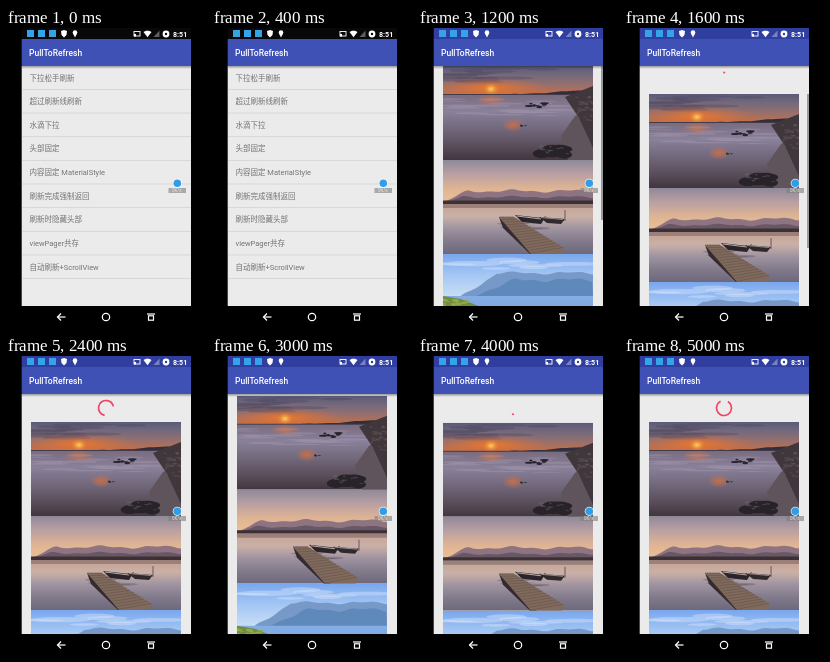
These frames come from a looping animation (200x300 px, 5200 ms). An HTML page with a canvas:

```html
<!DOCTYPE html>
<html lang="zh">
<head>
<meta charset="utf-8">
<title>PullToRefresh</title>
<style>
html, body { margin: 0; width: 100%; height: 100%; overflow: hidden; background: #000; }
canvas { display: block; width: 200px; height: 300px; }
</style>
</head>
<body>
<canvas id="stage"></canvas>
<script>
const LOOP = 5200, STEP = 200;
const LEFT = 15.7, WIDTH = 169.3, TOP = 38, BOTTOM = 278;
const PHOTO_W = 150, PHOTO_H = 94, HEADER = 28;
const OPEN = 600, SECOND_PULL = 3130, RELEASE = 3650;
const SPIN = 1333, SWEEP = 288, TURN = 234 / SPIN;

const canvas = document.getElementById('stage');
const c = canvas.getContext('2d');
const dpr = window.devicePixelRatio || 1;
canvas.width = 200 * dpr;
canvas.height = 300 * dpr;

const rows = ['下拉松手刷新', '超过刷新线刷新', '水滴下拉', '头部固定',
  '内容固定 MaterialStyle', '刷新完成强制返回', '刷新时隐藏头部',
  'viewPager共存', '自动刷新+ScrollView'];

const part = (t, from, to) => Math.min(1, Math.max(0, (t - from) / (to - from)));
const ease = x => 1 - (1 - part(x, 0, 1) ** 2) ** 4.5;
const easeOut = x => 1 - (1 - x) ** 2;

function pullAt(t) {
  return HEADER * easeOut(part(t, 1200, 1600))
    - HEADER * easeOut(part(t, 2700, 3100))
    + 44 * part(t, SECOND_PULL, RELEASE) ** 2
    - 16 * easeOut(part(t, RELEASE, 4100));
}

function seeded(seed) {
  return () => (seed = seed * 16807 % 2147483647) / 2147483647;
}

function rect(color, x, y, w, h) {
  c.fillStyle = color;
  c.fillRect(x, y, w, h);
}

function fade(y, h, ...colors) {
  const g = c.createLinearGradient(0, y, 0, y + h);
  colors.forEach((col, i) => g.addColorStop(i / (colors.length - 1), col));
  return g;
}

function band(y, h, ...colors) {
  rect(fade(y, h, ...colors), 0, y, PHOTO_W, h);
}

function poly(color, ...p) {
  c.fillStyle = color;
  c.beginPath();
  for (let i = 0; i < p.length; i += 2) c.lineTo(p[i], p[i + 1]);
  c.fill();
}

function oval(color, x, y, rx, ry = rx) {
  c.fillStyle = color;
  c.beginPath();
  c.ellipse(x, y, rx, ry, 0, 0, 7);
  c.fill();
}

function line(color, width, ...p) {
  c.strokeStyle = color;
  c.lineWidth = width;
  c.beginPath();
  for (let i = 0; i < p.length; i += 2) c.lineTo(p[i], p[i + 1]);
  c.stroke();
}

function text(str, x, y, font, color) {
  c.font = font + ' Roboto, "Noto Sans CJK SC", "Noto Sans CJK", sans-serif';
  c.fillStyle = color;
  c.fillText(str, x, y);
}

function glow(x, y, rx, ry, color) {
  c.save();
  c.translate(x, y);
  c.scale(rx, ry);
  const g = c.createRadialGradient(0, 0, 0, 0, 0, 1);
  g.addColorStop(0, color);
  g.addColorStop(1, 'rgba(230,110,50,0)');
  oval(g, 0, 0, 1);
  c.restore();
}

// soft streaks or stones scattered inside a box
function scatter(color, count, seed, x, y, w, h, rx, ry) {
  const rnd = seeded(seed);
  for (let i = 0; i < count; i++) {
    oval(color, x + rnd() * w, y + rnd() * h, rx * (0.5 + rnd()), ry * (0.5 + rnd()));
  }
}

// skyline rising from the left edge to full height over the given slope
function ridge(color, left, base, height, slope, rough) {
  const p = [left, base];
  for (let x = left; x <= PHOTO_W; x += 2) {
    const bump = Math.sin(x / 9) + 0.6 * Math.sin(x / 3.7 + 2);
    p.push(x, base - height * part(x, left, left + slope) - rough * bump);
  }
  poly(color, ...p, PHOTO_W, base);
}

function beach() {
  band(0, 29, '#5b5b78', '#766a7c', '#98706c', '#c66f45');
  scatter('rgba(66,62,86,.3)', 12, 5, 0, 2, 150, 15, 22, 1.5);
  glow(48, 22, 60, 10, 'rgba(245,120,35,.85)');
  glow(48, 23, 9, 7, '#ffd75c');
  ridge('#332e3c', 60, 29, 4, 70, 0.4);
  rect('#433b49', 0, 28, 150, 1.2);
  band(29, 65, '#796c80', '#89809a', '#746a7e', '#5d515e', '#41363f');
  scatter('rgba(178,165,184,.3)', 18, 9, 0, 32, 130, 18, 18, 0.8);
  glow(48, 34, 16, 6, 'rgba(225,125,75,.6)');
  glow(70, 59, 11, 7, 'rgba(222,110,55,.75)');
  scatter('#29252f', 9, 21, 86, 37, 20, 4, 3, 0.9);
  scatter('#342d35', 3, 4, 78, 59, 6, 1, 2, 0.7);
  poly('#5f535c', 150, 44, 132, 50, 118, 70, 125, 94, 150, 94);
  poly('#40373d', 122, 31, 150, 20, 150, 82, 136, 52);
  scatter('rgba(102,87,90,.5)', 25, 31, 134, 29, 16, 28, 2, 1);
  scatter('#282329', 9, 13, 99, 82, 24, 8, 7, 3);
  scatter('rgba(105,95,102,.55)', 12, 8, 97, 80, 28, 9, 2, 0.8);
}

function pier() {
  band(0, 43, '#8f8999', '#baa0a3', '#dfb493', '#edc093');
  ridge('#8d7480', 0, 43, 12, 25, 1.1);
  ridge('#685766', 0, 43, 6, 20, 0.8);
  rect('#3c3035', 0, 40.5, 150, 3.5);
  band(44, 50, '#c6a493', '#c9b0a7', '#9e929f', '#817a8b', '#6d687b');
  rect('rgba(90,70,78,.4)', 0, 44, 150, 4);
  scatter('rgba(70,62,76,.3)', 8, 17, 70, 62, 45, 7, 12, 1);
  poly('#2a242b', 72, 55, 99, 58, 103, 56, 98, 64, 79, 62);
  line('#c8bab3', 0.9, 74, 56, 98, 59);
  poly('#30292e', 96, 57, 122, 59, 118, 64, 104, 63);
  line('#aba09d', 0.8, 98, 57.5, 120, 59.5);
  line('#514349', 0.8, 122, 50, 122, 61);
  poly('#342b30', 56, 57, 60, 68, 87, 94, 94, 94);
  poly('#806a5d', 56, 57, 71, 57, 121, 88, 119, 94, 88, 94);
  for (let k = 0; k <= 1; k += 0.07) {
    line('#655249', 0.6, 56 + 32 * k, 57 + 37 * k, 71 + 50 * k, 57 + 31 * k);
  }
}

function lake() {
  band(0, 43, '#79a7ee', '#a5c7f4', '#c9dff5');
  scatter('rgba(220,232,250,.4)', 8, 11, 10, 5, 140, 12, 28, 2);
  ridge('#7799c8', 18, 43, 24, 36, 1);
  ridge('#5f88bb', 25, 43, 17, 48, 1.4);
  band(42, 52, '#86aee6', '#6293d2');
  poly('#718f3a', 0, 42, 18, 45, 38, 53, 80, 94, 0, 94);
  scatter('#91aa4b', 14, 6, 0, 45, 24, 8, 3, 0.8);
}

function list() {
  rows.forEach((label, i) => {
    const y = TOP + i * 23.65;
    text(label, 23.5, y + 14.5, '7.5px', '#727272');
    rect('#d2d2d2', LEFT, y + 23, WIDTH, 0.8);
  });
}

// the head sweeps ahead in the first half of a turn, the tail follows in the second
function spinner(t, pull) {
  const dragged = t >= SECOND_PULL;
  const dt = t - (dragged ? 4333 : 1590);
  const turns = Math.max(0, dt / SPIN);
  const p = turns % 1;
  const base = (dragged ? 191 : 270) + TURN * dt + SWEEP * Math.floor(turns);
  const held = dragged ? 240 * (1 - ease((t - RELEASE + 50) / 450)) : 0;
  const head = base + SWEEP * ease(2 * p) + 7;
  const tail = base + SWEEP * ease(2 * p - 1) - held - 7;
  c.strokeStyle = '#ee4468';
  c.lineWidth = 1.7;
  c.beginPath();
  c.arc(100, TOP + pull - HEADER / 2, 7.5, tail * Math.PI / 180, head * Math.PI / 180);
  c.stroke();
}

function page(t, pull) {
  if (pull > 0) spinner(t, pull);
  [beach, pier, lake].forEach((photo, i) => {
    c.save();
    c.translate(25, TOP + pull + i * PHOTO_H);
    c.beginPath();
    c.rect(0, 0, PHOTO_W, PHOTO_H);
    c.clip();
    photo();
    c.restore();
  });
  const bar = 0.7 * (1 - part(t, 1600, 1900));
  rect(`rgba(120,120,125,${bar})`, 183, TOP + pull, 2, 154);
}

function statusBar(color) {
  rect(color, LEFT, 0, WIDTH, 11);
  for (const x of [21, 32, 43]) rect('#35a3ea', x, 2, 7, 7);
  poly('#fff', 55, 3, 58, 2, 61, 3, 60.5, 7, 58, 9.5, 55.5, 7);
  oval('#fff', 69, 4.5, 2.3);
  poly('#fff', 67, 5.5, 71, 5.5, 69, 9.5);
  c.strokeStyle = '#fff';
  c.lineWidth = 0.9;
  c.strokeRect(128, 3.5, 6, 4.5);
  rect('#fff', 128, 6, 2, 2.5);
  poly('#fff', 137.5, 4, 140, 2.7, 143, 2.7, 145.5, 4, 141.5, 9.3);
  poly('rgba(255,255,255,.35)', 153.5, 2.5, 153.5, 9, 147.5, 9);
  oval('#fff', 160, 6, 3.4);
  oval(color, 160, 6, 1.2);
  text('8:51', 167, 9, 'bold 7.1px', '#fff');
}

function navBar() {
  rect('#000', 0, BOTTOM, 200, 22);
  line('#fff', 1.2, 59.5, 289, 51.5, 289);
  line('#fff', 1.2, 55, 285.5, 51.5, 289, 55, 292.5);
  c.beginPath();
  c.arc(100, 289, 3.7, 0, 7);
  c.stroke();
  c.strokeRect(142.5, 287.8, 5, 4.4);
  line('#fff', 1.2, 141, 286, 149, 286);
}

function badge() {
  rect('rgba(125,125,125,.6)', 162.5, 160, 17.5, 5);
  text('0K/s', 166, 164.3, '4.5px', '#e4e4e4');
  oval('rgba(255,255,255,.85)', 171.3, 155.3, 4.6);
  oval('#2f9de8', 171.3, 155.3, 3.8);
}

function draw(t) {
  const open = t >= OPEN, pull = pullAt(t);
  c.setTransform(dpr, 0, 0, dpr, 0, 0);
  rect('#000', 0, 0, 200, 300);
  rect('#ebebeb', LEFT, TOP, WIDTH, BOTTOM - TOP);
  c.save();
  c.beginPath();
  c.rect(LEFT, TOP, WIDTH, BOTTOM - TOP);
  c.clip();
  if (open) page(t, pull);
  else list();
  rect(fade(TOP, 3, 'rgba(0,0,0,.35)', 'rgba(0,0,0,0)'), LEFT, TOP, WIDTH, 3);
  c.restore();
  statusBar(open ? '#303f9f' : '#080808');
  rect('#3f51b5', LEFT, 11, WIDTH, TOP - 11);
  text('PullToRefresh', 23, 28.3, '500 8.5px', '#fff');
  badge();
  if (t >= SECOND_PULL && t < RELEASE) oval('rgba(225,220,220,.75)', 135, 183 + 2 * pull, 4.3);
  navBar();
}

const begin = performance.now();
function tick() {
  const t = (performance.now() - begin) % LOOP;
  draw(Math.floor(t / STEP) * STEP);
  requestAnimationFrame(tick);
}
tick();
</script>
</body>
</html>
```
